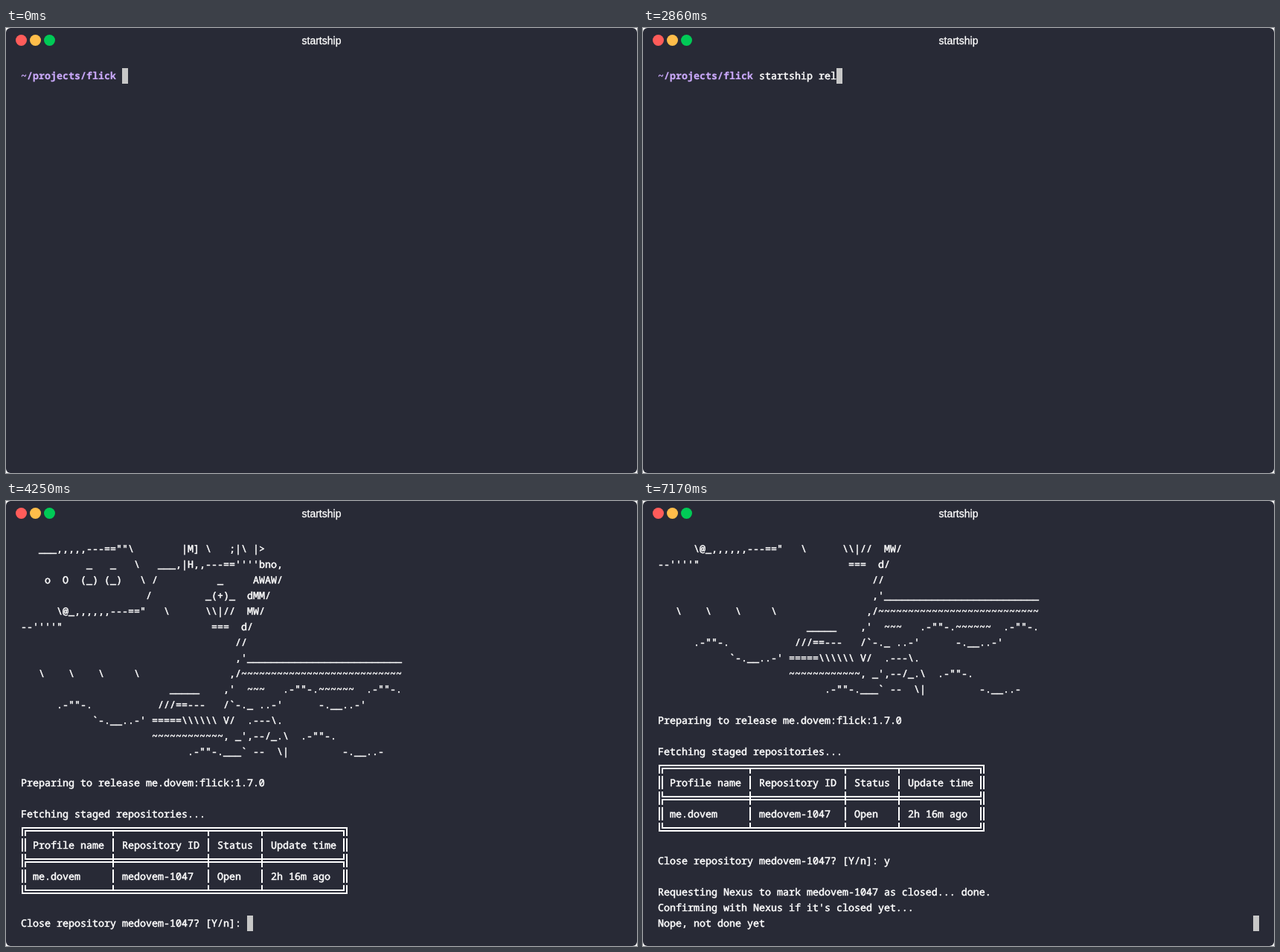
These frames come from a looping animation (848 by 599 pixels, 8000 ms). An HTML page:

```html
<!DOCTYPE html>
<html lang="en">
<head>
<meta charset="utf-8">
<title>startship</title>
<style>
  html, body { margin: 0; width: 100%; height: 100%; overflow: hidden; background: #fff; }
  svg { display: block; width: 100%; height: 100%; }
  .title { font: 14px "Liberation Sans", Arial, sans-serif; fill: #fff; stroke: #fff; stroke-width: .3; text-anchor: middle; }
  .term { font: 500 13.3333px "Noto Sans Mono", "DejaVu Sans Mono", monospace; fill: #fff;
    stroke: #fff; stroke-width: .5; font-variant-ligatures: none; text-rendering: geometricPrecision; }
  .term text { white-space: pre; }
  .prompt { fill: #caa9fa; stroke: #caa9fa; stroke-width: .2; font-weight: 700; }
  #rules { fill: none; stroke: #fff; stroke-width: 2; }
</style>
</head>
<body>
<svg viewBox="0 0 848 599">
  <rect width="848" height="599" rx="6" fill="#282a36"/>
  <circle cx="20.5" cy="16.5" r="7.5" fill="#ff5c5a"/>
  <circle cx="39.5" cy="16.5" r="7.5" fill="#ffbd4a"/>
  <circle cx="58.5" cy="16.5" r="7.5" fill="#00ca56"/>
  <text class="title" x="424" y="22">startship</text>
  <rect id="cursor" width="8" height="21" fill="#c7c7c7"/>
  <g id="lines" class="term"></g>
  <path id="rules"/>
</svg>
<script type="text/plain" id="art">
   ___,,,,,---==""\        |M] \   ;|\ |>
           _   _   \   ___,|H,,---==''''bno,
    o  O  (_) (_)   \ /          _     AWAW/
                     /         _(+)_  dMM/
      \@_,,,,,,---=="   \      \\|//  MW/
--''''"                         ===  d/
                                    //
                                    ,'__________________________
   \    \    \     \               ,/~~~~~~~~~~~~~~~~~~~~~~~~~~~
                         _____    ,'  ~~~   .-""-.~~~~~~  .-""-.
      .-""-.           ///==---   /`-._ ..-'      -.__..-'
            `-.__..-' =====\\\\\\ V/  .---\.
                      ~~~~~~~~~~~~, _',--/_.\  .-""-.
                            .-""-.___` --  \|         -.__..-
</script>
<script>
const LOOP = 8000, ROWS = 25, CELL = 8, LINE = 21, LEFT = 20, TOP = 54;
const PROMPT = "~/projects/flick", COMMAND = "startship release", REPO = "medovem-1047";
const $ = id => document.getElementById(id);

const keyTimes = [1200, 1390, 1500, 1600, 1820, 1970, 2220, 2270, 2350, 2490,
  2660, 2750, 2850, 2940, 3110, 3190, 3260];

const widths = [14, 15, 8, 13];
const border = (l, m, r) => l + widths.map(w => "═".repeat(w)).join(m) + r;
const row = cells => "║" + cells.map((c, i) => (" " + c).padEnd(widths[i])).join("│") + "║";
const table = [
  border("╔", "╤", "╗"),
  row(["Profile name", "Repository ID", "Status", "Update time"]),
  border("╠", "╪", "╣"),
  row(["me.dovem", REPO, "Open", "2h 16m ago"]),
  border("╚", "╧", "╝")
].join("\n");

// Everything the terminal prints, in order of time
const output = [
  [0, PROMPT + " "],
  ...keyTimes.map((t, i) => [t, COMMAND[i]]),
  [3420, "\n"],
  [3640, $("art").textContent + "\nPreparing to release me.dovem:flick:1.7.0\n\nFetching staged repositories...\n"],
  [4200, table + "\n"],
  [4225, "\n"],
  [4250, `Close repository ${REPO}? [Y/n]: `],
  [5360, "y"],
  [5610, `\n\nRequesting Nexus to mark ${REPO} as closed... `],
  [6110, "done.\nConfirming with Nexus if it's closed yet...\n"],
  [6160, "Nope, not done yet".padEnd(100)]
];

// Box characters as paths around the middle left of a cell
const H = 9, A = 2, B = 6;
const boxes = {
  "═": [[0, -2, 8, -2], [0, 2, 8, 2]],
  "║": [[A, -H, A, H], [B, -H, B, H]],
  "│": [[4, -H, 4, H]],
  "╔": [[8, -2, A, -2, A, H], [8, 2, B, 2, B, H]],
  "╗": [[0, -2, B, -2, B, H], [0, 2, A, 2, A, H]],
  "╚": [[8, 2, A, 2, A, -H], [8, -2, B, -2, B, -H]],
  "╝": [[0, 2, B, 2, B, -H], [0, -2, A, -2, A, -H]],
  "╠": [[A, -H, A, H], [8, -2, B, -2, B, -H], [8, 2, B, 2, B, H]],
  "╣": [[B, -H, B, H], [0, -2, A, -2, A, -H], [0, 2, A, 2, A, H]]
};
boxes["╤"] = [...boxes["═"], [4, 2, 4, H]];
boxes["╧"] = [...boxes["═"], [4, -H, 4, -2]];
boxes["╪"] = [...boxes["═"], ...boxes["│"]];

const boxPath = (ch, x, y) => boxes[ch].map(p =>
  "M" + p.map((v, i) => v + (i % 2 ? y : x)).join(" ")).join("");

function addText(str, col, y, name = "") {
  const el = document.createElementNS("http://www.w3.org/2000/svg", "text");
  el.setAttribute("x", LEFT + col * CELL);
  el.setAttribute("y", y);
  el.setAttribute("class", name);
  el.textContent = str;
  $("lines").append(el);
}

function draw(text) {
  const lines = text.split("\n").slice(-ROWS);
  let path = "";
  $("lines").textContent = "";
  lines.forEach((line, r) => {
    const y = TOP + r * LINE;
    const plain = [...line].map((ch, c) => {
      if (!boxes[ch]) return ch;
      path += boxPath(ch, LEFT + c * CELL, y + 10);
      return " ";
    }).join("");
    const start = plain.startsWith(PROMPT) ? PROMPT.length : 0;
    if (start) addText(PROMPT, 0, y + 15, "prompt");
    // One run per word group keeps columns on the grid
    for (const m of plain.slice(start).matchAll(/\S+( \S+)*/g))
      addText(m[0], start + m.index, y + 15);
  });
  $("rules").setAttribute("d", path);
  $("cursor").setAttribute("x", LEFT + lines.at(-1).length * CELL);
  $("cursor").setAttribute("y", TOP + (lines.length - 1) * LINE);
}

let shown = -1;
function render(t) {
  const due = output.filter(([at]) => at <= t);
  if (due.length === shown) return;
  shown = due.length;
  draw(due.map(([, s]) => s).join(""));
}

const began = performance.now();
function tick() {
  render((performance.now() - began) % LOOP);
  requestAnimationFrame(tick);
}
tick();
</script>
</body>
</html>
```
